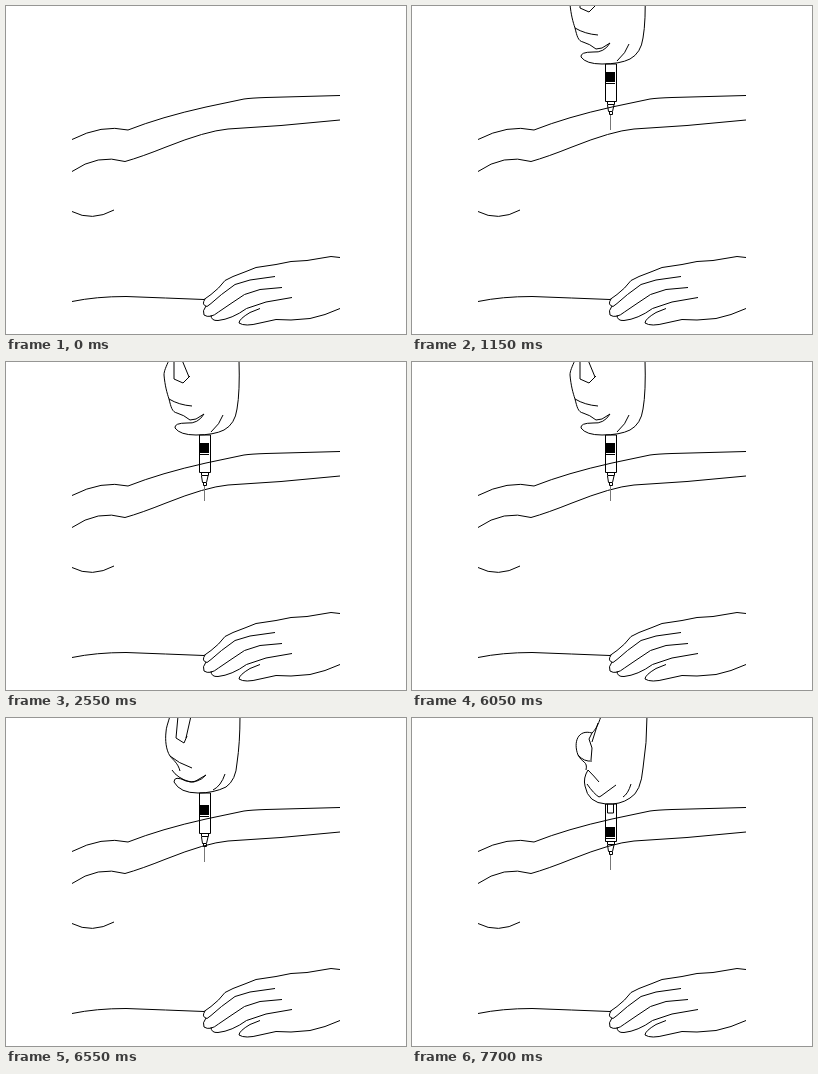
Recreate the animation shown at these times as an HTML page. Size 400 px wide and 328 px high, loop 8000 ms.

```html
<!DOCTYPE html>
<html>
<head>
<meta charset="utf-8">
<style>
html, body { margin: 0; height: 100%; overflow: hidden; background: #fff }
svg { display: block; width: 400px; height: 328px; fill: none; stroke: #000 }
</style>
</head>
<body>
<svg viewBox="0 0 400 328">
  <!-- arm -->
  <path d="M66 133.500 Q96 118 122 124 Q155 111 200 101 L238 93 Q245 92 260 91.500 L334 89.500
           M66 165.500 Q92 147.500 119 155.500 Q135 151 160 141 Q200 125 222 123 L275 119.500 L334 114
           M66 205.500 Q86 216 108 204"/>
  <!-- resting hand -->
  <path d="M66 295.500 Q90 290.500 120 290.500 Q160 292 198 293.500
           L205 288.500 L212.500 282 L219 274.500 L227 270.500 L240 265.500 L250 261.500 L270 258.500
           L285 255.500 L301 254.500 L325 250.500 L334 251.500
           M199 293 Q195 299 201 300.500 L205 297.500 L215.500 288.500 L229 278.500 L244 274 L269 270.500
           M200 300 Q196 305 198 309 Q204 313 212.500 306 L225 297.500 L238.500 288.500 L254 283.500 L276 281.500
           M205 309 Q205 315 212 314.500 Q226 313 240.500 302.500 L260 296 L286 291.500
           M254 302.500 L244 306.500 Q233 313 233 317 Q239 321 254 317 L270 313.500 L285 314 L304 312.500 L319 308.500 L334 302.500"/>
  <g id="tool">
    <path id="hand"/>
    <path id="barrel"/>
    <path d="M195.500 -28 V-25.500 H202.500 V-28 M195.500 -25 L196.500 -18.500 H200.500 L202 -25"/>
    <path d="M197.500 -18 V-15.500 H200.500 V-18"/>
    <path d="M198.500 -15 V0" stroke="#777"/>
    <g id="plunger">
      <rect x="194" y="-58" width="9" height="10" fill="#000" stroke="none"/>
      <path d="M194 -46.500 H203"/>
    </g>
    <path id="rod"/>
  </g>
</svg>
<script>
const $ = id => document.getElementById(id);
const clamp = x => Math.min(1, Math.max(0, x));
const lerp = (a, b, u) => a + (b - a) * u;

// Grip poses share one command sequence, so their numbers can be blended.
const poses = [
  { tip: 139, top: 73, push: 0, rod: 0, path:
    `M163 -2 C160 5 158 9 158 13 C159 24 161 31 163 37 C165 45 166 50 171 51
     M168 -2 L168 17 L177 21 L184 14 M176 -2 L183 15
     M163 37 Q173 43 186 44 M171 51 Q178 53 184 58 L190 57 L198 52
     M198 52 Q192 62 181 61 Q168 61 169 66 Q174 73 190 73 Q208 73 218 68 Q229 62 231 47 Q234 30 233 -2
     M217 53 Q214 62 205 70` },
  { tip: 144, top: 75, push: 1, rod: 0, path:
    `M164 -2 C162 5 160 10 160 14 C159 22 160 32 164 38 C167 42 172 45 174 53
     M172 -2 L170 20 L178 25 L181 18 M185 -2 L180 20
     M164 38 Q172 45 186 50 M166 52 Q171 60 184 64 L188 64 L200 57
     M200 57 Q192 66 180 63 Q168 57 168 64 Q174 75 192 75 Q208 75 220 69 Q230 62 231 45 Q234 25 234 -2
     M219 56 Q215 68 207 72` },
  { tip: 152, top: 86, push: 15, rod: 9, path:
    `M189 -2 C186 8 183 12 180 15 C166 11 161 24 166 37 C170 45 176 43 174 52
     M180 15 L177 21 L180 30 L179 42 M186 5 L180 24
     M166 37 Q172 44 180 43 M175 66 Q182 76 187 79 L189 78 L204 67
     M187 64 Q182 58 176 52 Q171 60 173 68 Q176 85 194 86 Q208 87 218 80 Q229 74 231 50 Q235 25 235 -2
     M219 66 Q216 76 211 79` }
];

function blendPath(a, b, u) {
  const to = b.match(/-?\d+/g);
  let i = 0;
  return a.replace(/-?\d+/g, n => lerp(+n, +to[i++], u).toFixed(1));
}

function descent(t) {
  return t < 1150 ? 124 - (1150 - t) * 0.1314 : 139 - 15 * Math.exp((1150 - t) / 114);
}

function draw(t) {
  const late = t > 6550;
  const [a, b] = late ? poses.slice(1) : poses;
  const u = clamp(late ? (t - 6550) / 1000 : (t - 6050) / 500);
  const mix = key => lerp(a[key], b[key], u);
  const grip = mix('tip'), top = mix('top') - grip;
  const tip = t < 6050 ? descent(t) : grip;

  $('tool').style.display = t < 200 ? 'none' : '';
  $('tool').setAttribute('transform', `translate(0 ${Math.round(tip)})`);
  $('hand').setAttribute('d', blendPath(a.path, b.path, u));
  $('hand').setAttribute('transform', `translate(0 ${-grip})`);
  $('barrel').setAttribute('d', `M193.500 ${top} V-28.500 H204.500 V${top} Z`);
  $('plunger').setAttribute('transform', `translate(0 ${Math.round(mix('push'))})`);
  $('rod').setAttribute('d', mix('rod') > 1 ? `M195.500 ${top} v${mix('rod')} h6 v${-mix('rod')}` : '');
}

const start = performance.now();
function tick() {
  const t = (performance.now() - start) % 8000;
  draw(Math.floor(t / 50) * 50);
  requestAnimationFrame(tick);
}
tick();
</script>
</body>
</html>
```
